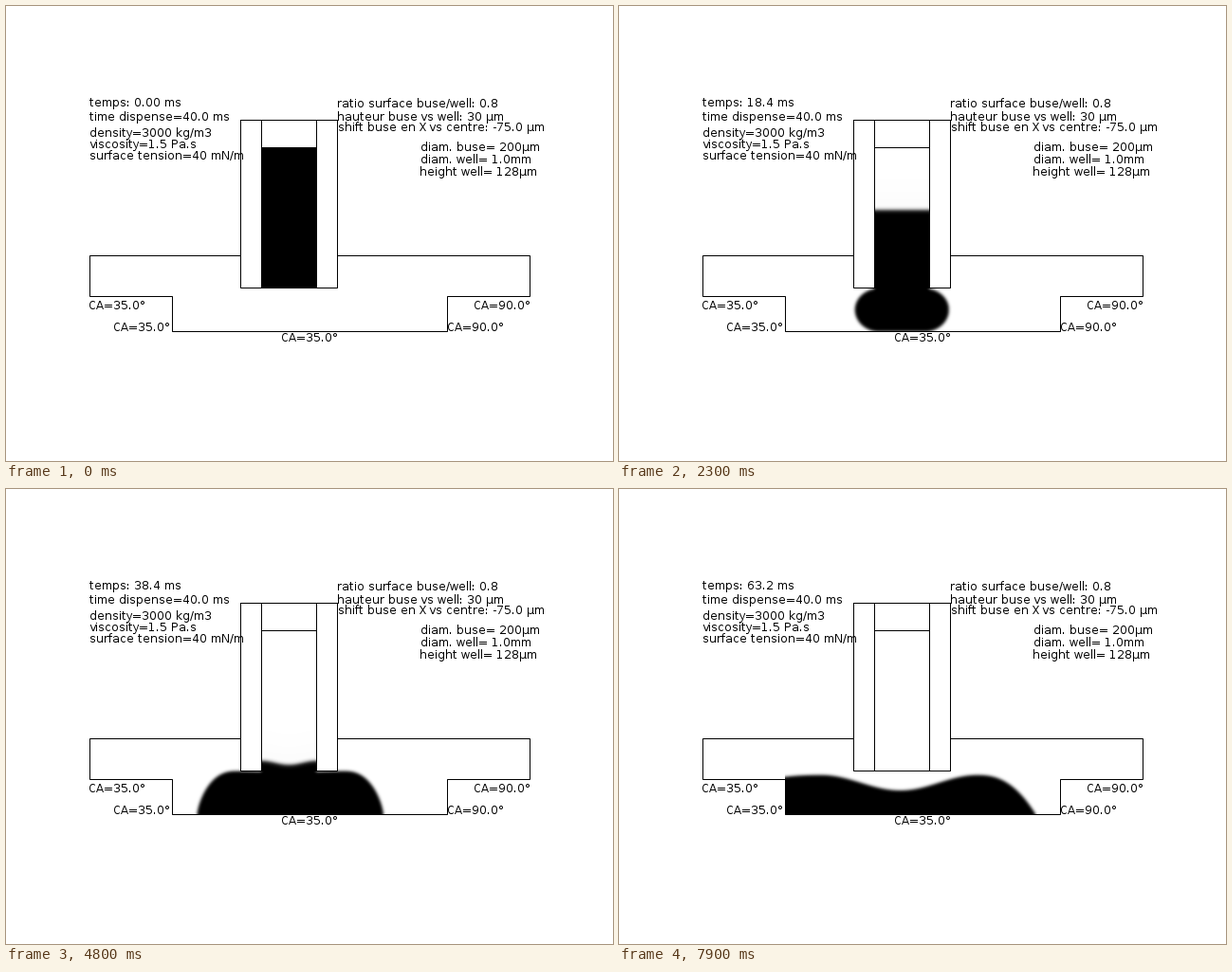
Recreate the animation shown at these times as a matplotlib script. Size 640x480 px, loop 8 s.

```python
import numpy as np
import matplotlib.pyplot as plt
from matplotlib.animation import FuncAnimation

# Whole-pixel glyph advances
plt.rcParams.update({"font.family": "DejaVu Sans", "text.hinting": "default",
                     "text.hinting_factor": 1})

FRAMES, STEP = 80, 100
W, H = 640, 480
PT = 72 / 100                         # points per pixel
X0, X1, Y0, Y1 = 160, 460, 140, 360   # window that holds the fluid
FLOOR, TIP, WALL_L = 343, 297, 175
TUBE_L, TUBE_R, AXIS = 269, 327, 298.3
SUB = 4

x_px = np.arange(X0, X1) + 0.5
y_px = (np.arange(Y0, Y1) + 0.5)[:, None]
xs = X0 + (np.arange((X1 - X0) * SUB) + 0.5) / SUB


def ease(t, a, b):
    """Cosine step from 0 at a to 1 at b."""
    return (1 - np.cos(np.pi * np.clip((t - a) / (b - a), 0, 1))) / 2


def ramp(t, w=0.3):
    """Zero, then t, with a soft knee."""
    return w * np.logaddexp(0, t / w)


def tube_top(x, t):
    """Free surface inside the nozzle, with a growing meniscus."""
    level = max(147.3 + 29.5 * t, 149.5)
    return level + 3 * ease(t, 4, 5.3) * np.cos(np.pi * (x - AXIS) / 29)


def outline(t):
    """Upper and lower edge of the fluid for each sub-column."""
    late = ramp(t - 6.8)              # the left side climbs its wall
    half = 27 + 19.5 * (ramp(t - 1.15) - late)
    centre = AXIS + 0.8 * ramp(t - 3)
    radius = 23 + 6.5 * ramp(t - 2)

    left, right = centre - half - 80 * late, centre + half
    peak_l, peak_r = centre - half + radius - 12 * late, right - radius
    mid = centre - 5 * late

    drop = np.sin(np.pi / 2 * min(t / 2, 1))
    settle = ease(t, 2.2, 3.4)
    waist = TIP + 23 * drop ** 2 + 23 * settle
    bottom = TIP + 46 * drop + 30 * settle
    crest = 292 + 6 * ease(t, 1.5, 2.3) - 2 * ramp(t - 4.8) + 9 * late
    valley = 298 + 20 * ease(t, 4.6, 6.3)

    s = np.clip(np.maximum((peak_l - xs) / (peak_l - left),
                           (xs - peak_r) / (right - peak_r)), 0, 1)
    power = 2 + 0.4 * ease(t, 3.6, 4.8)
    root = 0.5 + 0.5 * ease(t, 3.6, 6.3)
    top = crest + (waist - crest) * (1 - (1 - s ** power) ** root)
    bot = waist + (bottom - waist) * np.sqrt(1 - s * s)

    q = np.where(xs < mid, (xs - peak_l) / (mid - peak_l),
                 (peak_r - xs) / (peak_r - mid))
    top += (valley - crest) * ease(q, 0, 1)

    inside = (xs > TUBE_L) & (xs < TUBE_R)
    return np.where(inside, np.minimum(top, tube_top(xs, t)), top), bot


def blur(a, sigma, n=5):
    k = np.exp(-0.5 * (np.arange(-n, n + 1) / sigma) ** 2)
    k /= k.sum()
    rows, cols = a.shape
    p = np.pad(a, n, mode="edge")
    p = sum(w * p[i:i + rows] for i, w in enumerate(k))
    return sum(w * p[:, i:i + cols] for i, w in enumerate(k))


def fluid(t):
    soft = 0.1 + 1.5 * min(t / 0.5, 1)
    top, bot = outline(t)
    cover = np.clip(np.minimum(bot, y_px + 0.5) - np.maximum(top, y_px - 0.5),
                    0, 1)
    a = blur(cover.reshape(len(y_px), -1, SUB).mean(axis=2), soft)

    y = y_px[:, 0]
    above = y < TIP
    nozzle = (x_px > 247) & (x_px < 350)
    tube = (x_px > TUBE_L) & (x_px < TUBE_R + 1)
    a[np.ix_(above, nozzle)] = 0

    depth = y_px[above] - tube_top(x_px[tube], t)
    column = 1 / (1 + np.exp(np.clip(-depth / (0.75 * soft), -50, 50)))
    haze = 0.02 * np.exp(np.minimum(depth, 0) / 20)
    a[np.ix_(above, tube)] = np.maximum(column, haze) * (y_px[above] > 149)

    a[y > FLOOR] = 0
    a[:, x_px < WALL_L] = 0
    return a


fig = plt.figure(figsize=(W / 100, H / 100), dpi=100, facecolor="white")
ax = fig.add_axes([0, 0, 1, 1])
ax.axis("off")
img = ax.imshow(fluid(0), cmap="gray_r", vmin=0, vmax=1, aspect="auto",
                interpolation="nearest", extent=(X0, X1, Y1, Y0))
ax.set_xlim(0, W)
ax.set_ylim(H, 0)


def line(*pts):
    # Snapping moves whole coordinates to pixel centres
    px, py = np.array(pts).T + 0.1
    ax.plot(px, py, color="black", lw=PT, snap=True,
            solid_capstyle="projecting", solid_joinstyle="miter")


def label(x, y, s):
    return ax.text(x, y, s, fontsize=12 * PT, color="black",
                   ha="left", va="baseline")


# Well
line((247, 263), (88, 263), (88, 306), (175, 306), (175, 343), (465, 343),
     (465, 306), (552, 306), (552, 263), (349, 263))
# Nozzle
line((247, 120), (349, 120), (349, 297), (247, 297), (247, 120))
for x in (TUBE_L, TUBE_R):
    line((x, 120), (x, 297))
line((TUBE_L, 149), (TUBE_R, 149))

clock = label(88, 106, "")
for x, y, s in (
    (88, 121, "time dispense=40.0 ms"),
    (88, 138, "density=3000 kg/m3"),
    (88, 150, "viscosity=1.5 Pa.s"),
    (88, 162, "surface tension=40 mN/m"),
    (349, 107, "ratio surface buse/well: 0.8"),
    (349, 121, "hauteur buse vs well: 30 µm"),
    (350, 132, "shift buse en X vs centre: -75.0 µm"),
    (437, 153, "diam. buse= 200µm"),
    (437, 166, "diam. well= 1.0mm"),
    (436, 179, "height well= 128µm"),
):
    label(x, y, s)

# Contact angles along the well
for x, y, angle in ((87, 320, 35), (113, 343, 35), (290, 354, 35),
                    (493, 320, 90), (465, 343, 90)):
    label(x, y, f"CA={angle:.1f}°")


def update(i):
    img.set_data(fluid(i * STEP / 1000))
    clock.set_text(f"temps: {0.8 * i:#.3g} ms")
    return img, clock


anim = FuncAnimation(fig, update, frames=FRAMES, interval=STEP,
                     repeat=True, repeat_delay=0, blit=False)
plt.show()
```
